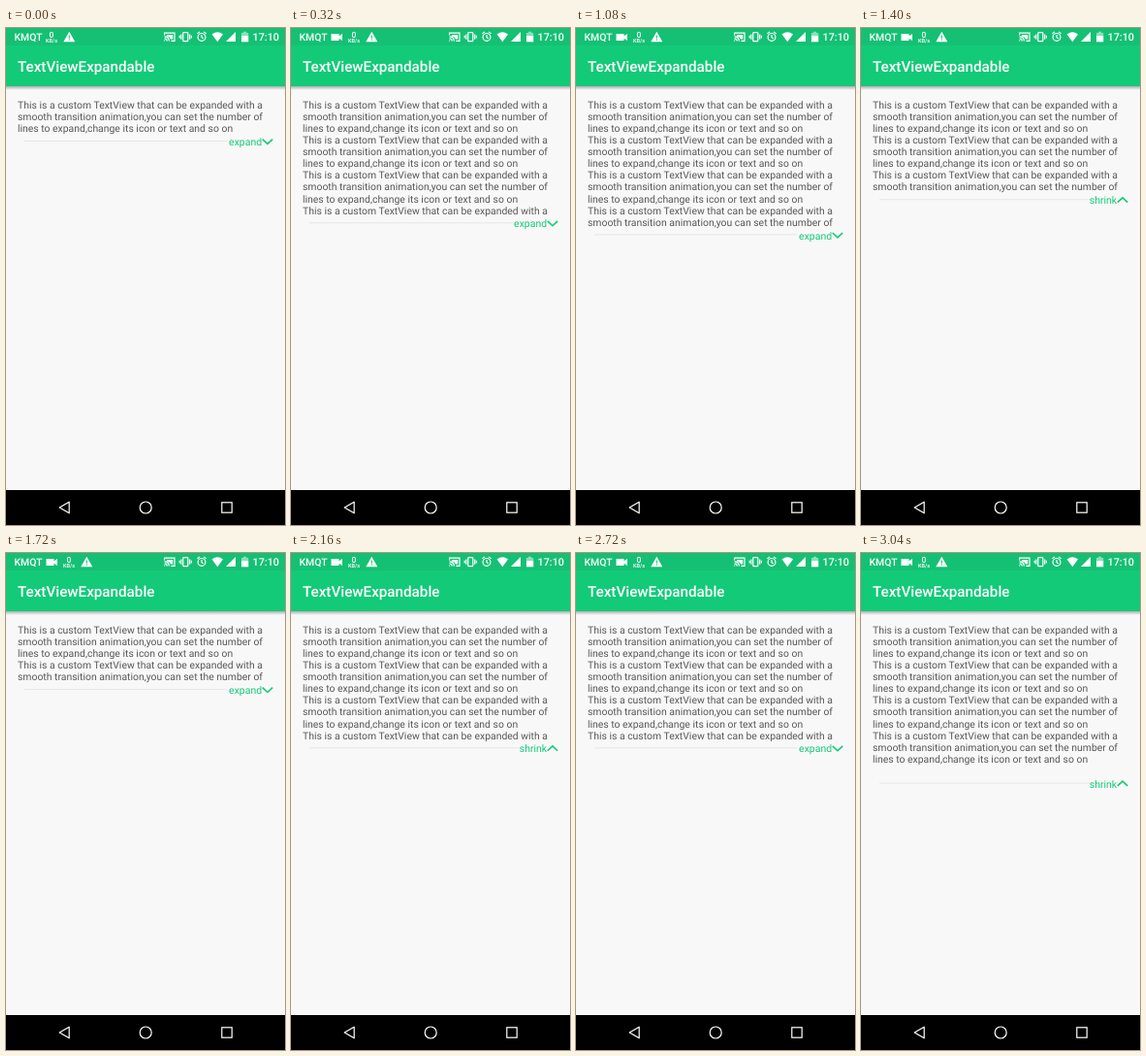
An HTML page for the animation above (3080 ms loop, 288x512 px).

```html
<!DOCTYPE html>
<html lang="en">
<head>
<meta charset="utf-8">
<title>Expandable text</title>
<style>
  html, body { margin: 0; width: 100%; height: 100%; overflow: hidden; background: #f8f8f8; }
  svg { display: block; width: 288px; height: 512px; }
  text { font-family: Roboto, "Noto Sans", sans-serif; text-rendering: geometricPrecision; }
  .bar { fill: #fff; font-weight: 500; }
  .line { fill: none; stroke: #fff; stroke-width: 1.2; }
  #copy { fill: #585858; font-size: 10.41px; }
  #label { fill: #14c977; font-size: 10.5px; }
  #chevron { fill: none; stroke: #14c977; stroke-width: 1.6; }
</style>
</head>
<body>
<svg viewBox="0 0 288 512">
  <defs>
    <linearGradient id="shade" x2="0" y2="1">
      <stop offset="0" stop-color="#000" stop-opacity=".3"/>
      <stop offset="1" stop-color="#000" stop-opacity="0"/>
    </linearGradient>
  </defs>
  <rect width="288" height="512" fill="#f8f8f8"/>
  <rect width="288" height="60" fill="#13ca78"/>
  <rect width="288" height="18" fill="#15c074"/>
  <rect y="60" width="288" height="4" fill="url(#shade)"/>
  <text class="bar" x="12" y="44.7" font-size="15.2">TextViewExpandable</text>

  <!-- status bar, left -->
  <text class="bar" x="8.5" y="13" font-size="10.4">KMQT</text>
  <path id="camera" fill="#fff" d="M41.5 6h8v2.3l3.5-2.3v7l-3.5-2.3v2.3h-8z"/>
  <g id="notices">
    <text class="bar" x="47" y="9.5" font-size="8.5" text-anchor="middle">0</text>
    <text class="bar" x="47" y="15" font-size="5.6" text-anchor="middle">KB/s</text>
    <path fill="#fff" d="M65.3 3.8l6 10.4h-12z"/>
    <path stroke="#15c074" stroke-width="1.1" d="M65.3 7.4v3.3M65.3 11.6v1.2"/>
  </g>

  <!-- status bar, right -->
  <g class="line">
    <path d="M163.6 7.5v-2.4h10.4v8.2h-3.6M163.6 12.6v.9M163.6 10.8q2.6 0 2.6 2.7M163.6 8.9q4.7 0 4.7 4.6"/>
    <path fill="#fff" stroke="none" d="M166 7h6.2v4.6h-2.2q-.8-2.8-4-3.2z"/>
    <rect x="182.8" y="4.6" width="5" height="9" rx=".6"/>
    <path d="M180.9 6.4v5.4M179.2 7.8v2.6M189.7 6.4v5.4M191.4 7.8v2.6"/>
    <circle cx="202" cy="9.4" r="3.9"/>
    <path d="M202 7.1v2.6l1.8 1M197.4 5.9l2.5-2M206.6 5.9l-2.5-2"/>
  </g>
  <g fill="#fff">
    <path d="M212.6 6.4q5.7-4.2 11.4 0l-5.7 7.8z"/>
    <path d="M237 4v10h-10z"/>
    <path d="M243 5h2v-1.2h3.2v1.2h2v9.2h-7.2z" opacity=".5"/>
    <path d="M243 8h7.2v6.2h-7.2z"/>
  </g>
  <text class="bar" x="282" y="13" font-size="10.8" text-anchor="end">17:10</text>

  <g id="copy"></g>
  <g id="footer">
    <path id="rule" stroke="#e6e6e6"/>
    <text id="label" x="264.2" y="4.1" text-anchor="end"></text>
    <path id="chevron"/>
  </g>

  <rect y="476" width="288" height="36"/>
  <g class="line">
    <path d="M65.2 488.2v11.6l-10-5.8z" stroke-linejoin="round"/>
    <circle cx="144.2" cy="494" r="6"/>
    <rect x="222.8" y="488.8" width="10.4" height="10.4"/>
  </g>
</svg>
<script>
  const TICK = 40, LOOP = 3080, LINE = 12.05, MIN = 3, MAX = 13;
  const phrases = [
    "This is a custom TextView that can be expanded with a",
    "smooth transition animation,you can set the number of",
    "lines to expand,change its icon or text and so on"
  ];
  // [tick, visible lines]; linear in between, rounded to whole lines
  const steps = [[0, 3], [1, 3], [11, 13], [21, 3], [29, 13], [30, 13],
                 [40, 3], [41, 3], [51, 13], [61, 3], [71, 13], [77, 13]];
  const $ = id => document.getElementById(id);

  // The text ends in an empty line, so the last step adds only space.
  const lines = Array.from({ length: MAX - 1 }, (_, i) => {
    const row = document.createElementNS("http://www.w3.org/2000/svg", "text");
    row.setAttribute("x", 12);
    row.setAttribute("y", 83.1 + i * LINE);
    row.textContent = phrases[i % 3];
    $("copy").append(row);
    return row;
  });

  function stateAt(tick) {
    const i = steps.findIndex(s => s[0] > tick);
    const [t0, n0] = steps[i - 1], [t1, n1] = steps[i];
    const count = Math.round(n0 + (n1 - n0) * (tick - t0) / (t1 - t0));
    const open = count === MAX || (count > MIN && n1 < n0);
    return { count, open };
  }

  function draw(tick) {
    const { count, open } = stateAt(tick);
    lines.forEach((row, i) => row.style.display = i < count ? "" : "none");
    $("footer").setAttribute("transform", `translate(0 ${117 + (count - MIN) * LINE})`);
    $("label").textContent = open ? "shrink" : "expand";
    $("rule").setAttribute("d", `M19 -.5H${open ? 236 : 228}`);
    $("chevron").setAttribute("d", open ? "M264.8 2.4l5.2-4.8l5.2 4.8" : "M264.8-2.4l5.2 4.8l5.2-4.8");
    $("camera").style.display = tick ? "" : "none";
    $("notices").setAttribute("transform", `translate(${tick ? 18 : 0} 0)`);
  }

  const start = performance.now();
  function loop() {
    draw(Math.floor((performance.now() - start) % LOOP / TICK));
    requestAnimationFrame(loop);
  }
  loop();
</script>
</body>
</html>
```
